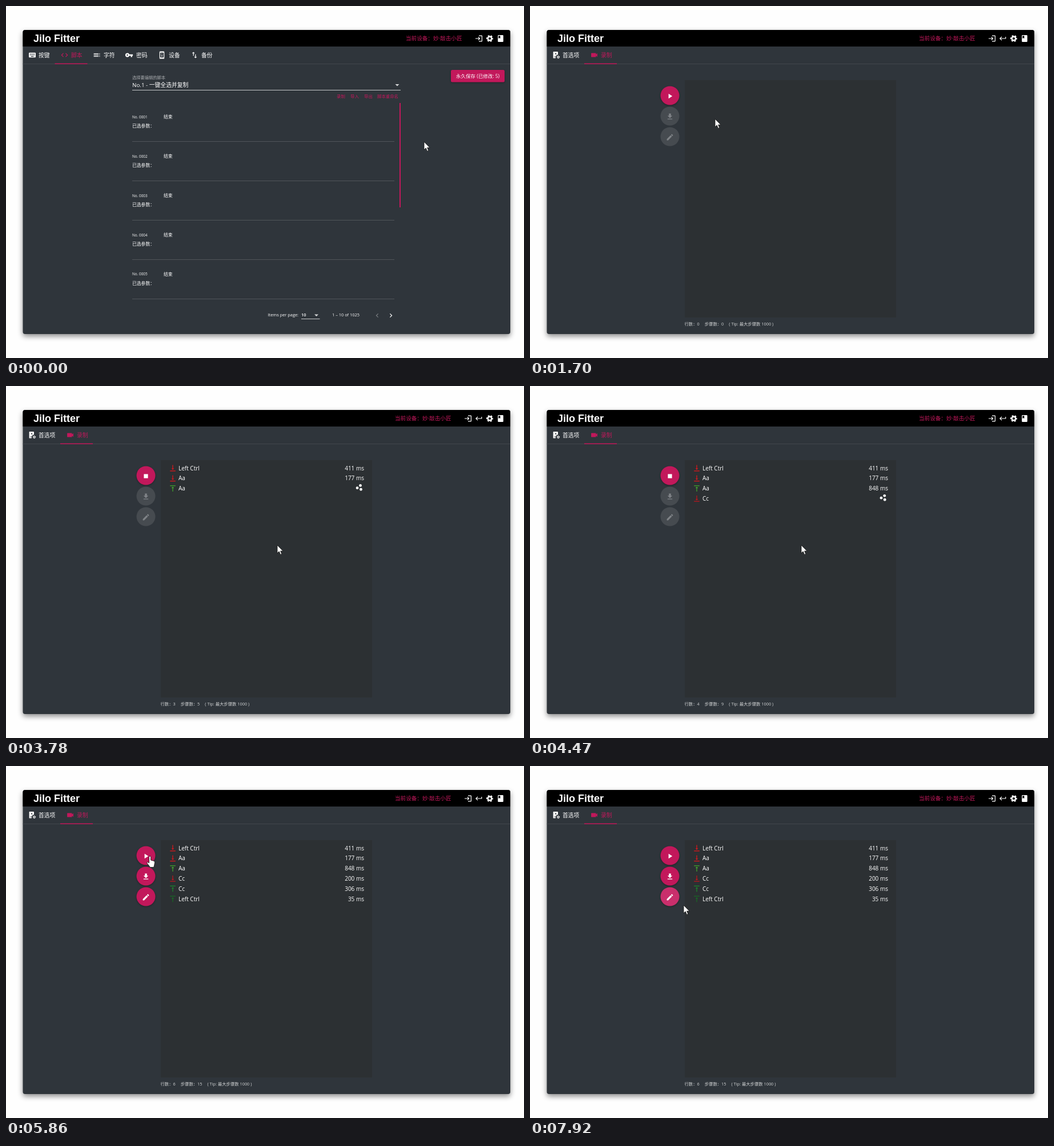
Write an HTML page that moves like this. It is 907x617 px and loops after 8 s.

```html
<!DOCTYPE html>
<html lang="zh-CN">
<head>
<meta charset="utf-8">
<style>
html, body { margin: 0; width: 100%; height: 100%; overflow: hidden; background: #fefefe; }
svg { display: block; font-family: "Open Sans", "Noto Sans CJK SC", "Noto Sans CJK", sans-serif; }
.window { filter: drop-shadow(0 4px 5px rgba(0,0,0,.45)); }
.fab { filter: drop-shadow(0 1.5px 1.5px rgba(0,0,0,.35)); }
</style>
</head>
<body>
<svg id="stage" width="907" height="617" viewBox="0 0 907 617"></svg>
<script>
const PINK = '#c2185b', WHITE = '#fff';

const keyHoles = [5, 8, 11, 14, 17].map(x => [8, 11].map(y => `M${x} ${y}h2v2h-2z`).join('')).join('');
const ICONS = {
  keyboard: 'M2 7a2 2 0 0 1 2-2h16a2 2 0 0 1 2 2v10a2 2 0 0 1-2 2H4a2 2 0 0 1-2-2zM8 15v2h8v-2z' + keyHoles,
  code: 'M9.4 16.6 4.8 12l4.6-4.6L8 6l-6 6 6 6zm5.2 0 4.6-4.6-4.6-4.6L16 6l6 6-6 6z',
  list: 'M3 7h14v2H3zm0 4h14v2H3zm0 4h14v2H3zM19 7h2v2h-2zm0 4h2v2h-2zm0 4h2v2h-2z',
  key: 'M12.65 10a6 6 0 1 0 0 4H17v4h4v-4h2v-4zM7 14a2 2 0 1 1 0-4 2 2 0 0 1 0 4z',
  phone: 'M11 7h2v2h-2zm0 4h2v6h-2zM7 1h10a2 2 0 0 1 2 2v18a2 2 0 0 1-2 2H7a2 2 0 0 1-2-2V3a2 2 0 0 1 2-2zM7 5v14h10V5z',
  swap: 'M16 17v-7h-2v7h-3l4 4 4-4zM9 3 5 7h3v7h2V7h3z',
  login: 'M11 7 9.6 8.4l2.6 2.6H2v2h10.2l-2.6 2.6L11 17l5-5zm9 12h-8v2h8a2 2 0 0 0 2-2V5a2 2 0 0 0-2-2h-8v2h8z',
  back: 'M19 7v4H5.8l3.6-3.6L8 6l-6 6 6 6 1.4-1.4L5.8 13H21V7z',
  book: 'M6 2h12a2 2 0 0 1 2 2v16a2 2 0 0 1-2 2H6a2 2 0 0 1-2-2V4a2 2 0 0 1 2-2zm0 2v8l2.5-1.5L11 12V4z',
  video: 'M17 10.5V7a1 1 0 0 0-1-1H4a1 1 0 0 0-1 1v10a1 1 0 0 0 1 1h12a1 1 0 0 0 1-1v-3.5l4 4v-11z',
  page: 'M4 2h11a2 2 0 0 1 2 2v7h-4v3h-3v7H3V3zM6 16v2h3v-2zM9 6v4h3V6z',
  play: 'M8 5v14l11-7z',
  stop: 'M6 6h12v12H6z',
  save: 'M19 9h-4V3H9v6H5l7 7zM5 18v2h14v-2z',
  edit: 'M3 17.25V21h3.75L17.8 9.94l-3.75-3.75zM20.7 7a1 1 0 0 0 0-1.4l-2.3-2.3a1 1 0 0 0-1.4 0l-1.9 1.8 3.8 3.8z',
  down: 'M16 13h-3V3h-2v10H8l4 4zM4 19v2h16v-2z',
  up: 'M8 11h3v10h2V11h3l-4-4zM4 3v2h16V3z',
  drop: 'M5 9l7 7 7-7z',
  prev: 'M15.4 7.4 14 6l-6 6 6 6 1.4-1.4-4.6-4.6z',
  next: 'M8.6 7.4 10 6l6 6-6 6-1.4-1.4 4.6-4.6z'
};

const rect = (x, y, w, h, fill, r = 0) => `<rect x="${x}" y="${y}" width="${w}" height="${h}" rx="${r}" fill="${fill}"/>`;
const text = (x, mid, str, size = 9.8, fill = WHITE, more = '') =>
  `<text x="${x}" y="${mid + size * .36}" font-size="${size}" fill="${fill}" ${more}>${str}</text>`;
const icon = (name, x, y, fill = WHITE, k = .6) =>
  `<path d="${ICONS[name]}" fill="${fill}" fill-rule="evenodd" transform="translate(${x} ${y}) scale(${k}) translate(-12 -12)"/>`;
const gear = (x, y, k = .6) =>
  `<g transform="translate(${x} ${y}) scale(${k})" fill="none" stroke="#fff">
    <circle r="5.6" stroke-width="4.2"/><circle r="8.5" stroke-width="3" stroke-dasharray="4.9 4" stroke-dashoffset="2.4"/></g>`;
const tab = (name, ix, tx, label, active) => {
  const c = active ? PINK : WHITE;
  return icon(name, ix, 86, c) + text(tx, 86, label, 9.8, c, 'font-weight="500"');
};

function frameBox(recorder) {
  return `<g class="window">${rect(29.5, 42, 853.5, 533, '#2f353b', 4)}</g>
    <path d="M29.5 71V46a4 4 0 0 1 4-4H879a4 4 0 0 1 4 4v25z" fill="#000"/>` +
    rect(29.5, 101, 853.5, 1, '#42474d') +
    text(48, 56.5, 'Jilo Fitter', 18, WHITE, 'font-weight="700" style="font-family:\'Liberation Sans\',sans-serif"') +
    text(recorder ? 681 : 700, 57, '当前设备：妙·敲击小匠', 9.6, PINK) +
    icon('login', recorder ? 809 : 828, 57) + (recorder ? icon('back', 828, 57) : '') +
    gear(847, 57) + icon('book', 866, 57);
}

function scriptPage() {
  let s = tab('keyboard', 46, 57, '按键') + tab('code', 102.5, 114, '脚本', true) +
    tab('list', 159, 171, '字符') + tab('key', 215.5, 228, '密码') +
    tab('phone', 273, 285, '设备') + tab('swap', 330, 342, '备份') +
    rect(85.5, 100.5, 57, 1.5, PINK) +
    `<g class="fab">${rect(779, 112, 94, 21.5, PINK, 2.5)}</g>` +
    text(826, 123, '永久保存 (已修改: 5)', 8.5, WHITE, 'text-anchor="middle" font-weight="500"') +
    text(221, 125, '选择要编辑的脚本', 7.25, '#a9acaf') +
    text(221, 138.5, 'No.1 - 一键全选并复制') +
    icon('drop', 685, 138.5, '#d5d7d8', .5) + rect(221, 147, 470, 1, '#c4c6c8') +
    rect(689, 170, 2, 183, PINK);
  [[579, '录制'], [603, '导入'], [627, '导出'], [650, '脚本重命名']]
    .forEach(([x, label]) => s += text(x, 158.5, label, 7.4, PINK));
  for (let i = 0; i < 5; i++) {
    const y = 194.5 + i * 68.9;
    s += text(221, y, 'No. 000' + (i + 1), 6.4) + text(276, y, '结束', 7.8) +
      text(221, y + 16, '已选参数：', 7.8) + rect(221, Math.round(y + 42.6), 459, 1, '#50555a');
  }
  return s + text(458.5, 541.5, 'Items per page:', 7.4) + text(517, 541.5, '10', 7.4, WHITE, 'font-weight="600"') +
    icon('drop', 543.5, 542, '#d5d7d8', .5) + rect(517, 548, 32.5, 1, '#c4c6c8') +
    text(571, 541.5, '1 – 10 of 1025', 7.4) + icon('prev', 650, 542.5, '#7c8084') + icon('next', 674, 542.5);
}

// [step shown, direction, key, delay in ms, colour]
const KEYS = [
  [18, 'down', 'Left Ctrl', 411, '#e3151b'], [21, 'down', 'Aa', 177, '#e3151b'],
  [22, 'up', 'Aa', 848, '#43a82c'], [26, 'down', 'Cc', 200, '#c0141c'],
  [28, 'up', 'Cc', 306, '#1b8a2a'], [29, 'up', 'Left Ctrl', 35, '#176b24']
];
const COUNTS = [0, 1, 3, 5, 9, 11, 13];
const START = 13, STOP = 32, FOCUS = 44, SWITCH = 8;

function fab(name, y, on, fill = PINK) {
  return `<circle cx="245" cy="${y}" r="16.5" fill="${on ? fill : '#464b50'}" ${on ? 'class="fab"' : ''}/>` +
    icon(name, 245, y + 1, on ? WHITE : '#7f8387');
}

function spinner(y, step) {
  let s = '';
  for (let i = 0; i < 3; i++) {
    const a = (172 + (step - 22) * 31.1 + i * 120) * Math.PI / 180;
    s += `<circle cx="${619 + 4 * Math.cos(a)}" cy="${y + 4 * Math.sin(a)}" r="2.4" fill="#fff"/>`;
  }
  return s;
}

function recordPage(step) {
  const done = step >= STOP, rows = KEYS.filter(k => step >= k[0]);
  let s = icon('page', 46, 86) + gear(49.5, 89.5, .27) + text(57, 86, '首选项', 9.8, WHITE, 'font-weight="500"') +
    tab('video', 112.5, 124, '录制', true) + rect(95, 100.5, 57, 1.5, PINK) +
    rect(271, 130, 370, 416, '#2c3033') +
    fab(step >= START && !done ? 'stop' : 'play', 157, true) + fab('save', 193, done) +
    fab('edit', 229, done, step >= FOCUS ? '#c92f6c' : PINK);
  rows.forEach(([, dir, key, delay, color], i) => {
    const y = 144 + i * 17.8;
    s += icon(dir, 292, y, color) + text(302, y, key, 10) +
      (done || i < rows.length - 1 ? text(627, y, delay + ' ms', 10, WHITE, 'text-anchor="end"') : spinner(y - 1.5, step));
  });
  const count = done ? 15 : COUNTS[rows.length];
  return s + text(270.5, 557, `行数：${rows.length}<tspan dx="9">步骤数：${count}</tspan><tspan dx="9">( Tip: 最大步骤数 1000 )</tspan>`,
    7.35, '#d4d6d7', 'font-weight="500"');
}

// pointer path: [step, x, y]
const PATH = [
  [0, 732, 238], [1, 683, 210], [2, 683, 210], [4, 600, 168], [5, 593, 162], [8, 593, 162],
  [10, 324, 198], [11, 268, 172], [12, 251, 157], [13, 251, 157], [14, 330, 200], [16, 530, 276],
  [18, 475, 279], [27, 475, 279], [28, 430, 255], [30, 264, 165], [31, 252, 158], [35, 252, 158],
  [37, 268, 207], [38, 264, 226], [39, 250, 237], [40, 249, 238], [43, 249, 238], [44, 254, 240], [46, 269, 244]
];

function pointer(step) {
  const i = Math.max(1, PATH.findIndex(p => p[0] >= step));
  const [s0, x0, y0] = PATH[i - 1], [s1, x1, y1] = PATH[i];
  const k = (step - s0) / (s1 - s0), x = x0 + (x1 - x0) * k, y = y0 + (y1 - y0) * k;
  const over = step <= SWITCH ? x < 600 && y < 167
    : [157, 229].some(cy => Math.hypot(x - 245, y - cy) < 17);
  const shape = over
    ? 'M-1.5 1.5a1.5 1.5 0 0 1 3 0V7l5.3 1.4q2 .6 1.7 2.8l-.8 4.8-1 3.5H.5L-4.5 13q-1.6-2.2.4-2.8L-1.5 12z'
    : 'M0 0v14l3.2-3 2.3 5.4 2.3-1-2.2-5.1H10z';
  return `<path transform="translate(${x} ${y})" d="${shape}" fill="#fff" stroke="#111" stroke-width=".8"/>`;
}

const stage = document.getElementById('stage');
let shown = -1;
function tick() {
  const t = performance.now() % 8000;
  const step = Math.min(46, Math.floor(t < 1700 ? t / 170 : 10 + (t - 1700) / 172.7));
  if (step !== shown) {
    shown = step;
    const recorder = step >= SWITCH;
    stage.innerHTML = frameBox(recorder) + (recorder ? recordPage(step) : scriptPage()) + pointer(step);
  }
  requestAnimationFrame(tick);
}
tick();
</script>
</body>
</html>
```
